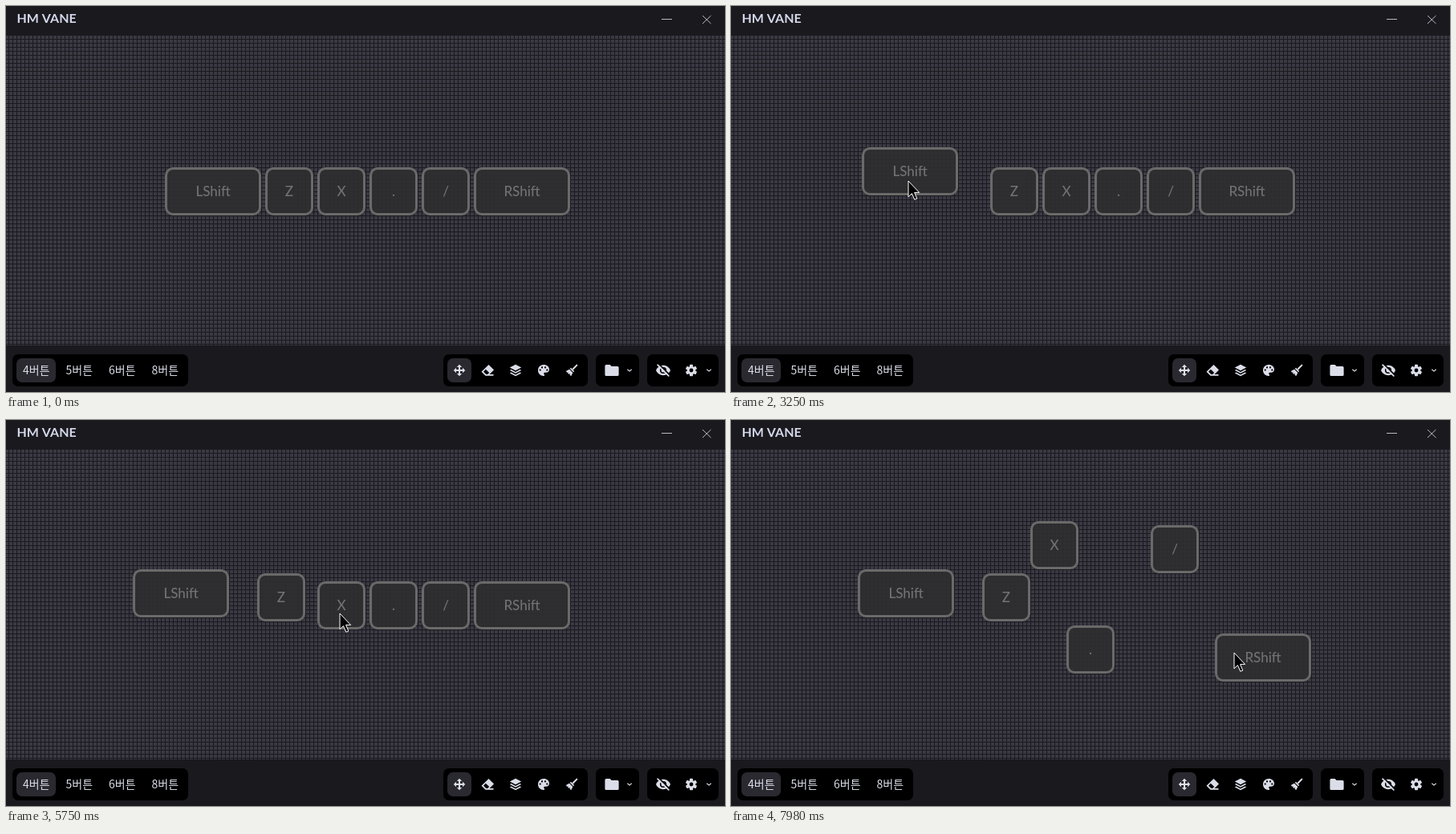
Animation, 896 px wide and 481 px high, one loop 8 s. Source, as an HTML page with a canvas:

```html
<!DOCTYPE html>
<html lang="ko">
<head>
<meta charset="utf-8">
<title>Key layout</title>
<style>
  html, body { margin: 0; width: 100%; height: 100%; overflow: hidden; background: #1a191e; }
  canvas { display: block; width: 896px; height: 481px; }
</style>
</head>
<body>
<canvas id="stage" width="896" height="481"></canvas>
<script>
const W = 896, H = 481, LOOP = 8000, STEP = 5;
const BAR = '#1a191e', PANEL = '#000', ACTIVE = '#2a2930', FG = '#dbdee8';
const UI_FONT = '14px "Noto Sans CJK KR", "Noto Sans CJK", "Noto Sans CJK JP", sans-serif';
const TITLE_FONT = '700 16px Lato, "Open Sans", sans-serif';
const KEY_FONT = '500 17px Lato, "Open Sans", sans-serif';
const ctx = document.getElementById('stage').getContext('2d');

// Quarter points of a clockwise ellipse, starting at its bottom.
const orbit = (cx, cy, rx, ry, count) => Array.from({ length: count }, (_, i) => {
  const a = (i + 1) * Math.PI / 2;
  return [cx + rx * Math.cos(a), cy + ry * Math.sin(a)];
});

// Each key is grabbed at a point and dragged through offsets; the last is the drop.
const keys = [
  { label: 'LShift', w: 120, from: 2010, to: 3410, grab: [256, 240], via: [...orbit(-31, 2, 51, 38, 7), [-40, -15]] },
  { label: 'Z', w: 60, from: 4122, to: 5100, grab: [343, 237], via: [[18, 68], [20, 27], [-19, -39], [-39, -22], [-10, -10]] },
  { label: 'X', w: 60, from: 5740, to: 6200, grab: [415, 240], via: [[5, 8], [-15, -75]] },
  { label: '.', w: 60, from: 6530, to: 6850, grab: [457, 223], via: [[10, 30], [-22, 59], [-35, 55]] },
  { label: '/', w: 60, from: 7110, to: 7400, grab: [535, 230], via: [[5, -70]] },
  { label: 'RShift', w: 120, from: 7790, to: LOOP, grab: [606, 224], via: [[20, 65]] }
];

// The pointer enters, rests, then alternates between drags and glides.
const legs = [
  { from: 800, to: 1330, pts: [[890, 338], [278, 240]] },
  { from: 1470, to: 1820, pts: [[278, 240], keys[0].grab] }
];
let left = 198;
keys.forEach((k, i) => {
  k.x = left;
  left += k.w + STEP;
  const pts = [[0, 0], ...k.via].map(([x, y]) => [k.grab[0] + x, k.grab[1] + y]);
  legs.push({ from: k.from, to: k.to, pts });
  const next = keys[i + 1];
  if (!next) return;
  const gap = next.from - k.to;
  legs.push({ from: k.to + gap * 0.25, to: k.to + gap * 0.78, pts: [pts.at(-1), next.grab] });
});

// Spline tangent, flat at ends and turning points.
function slope(pts, i, c) {
  const a = pts[i - 1], b = pts[i], d = pts[i + 1];
  if (!a || !d || (b[c] - a[c]) * (d[c] - b[c]) <= 0) return 0;
  return (d[c] - a[c]) / 2;
}

function pointer(t) {
  const { from, to, pts } = legs.findLast(l => t >= l.from) || legs[0];
  const u = Math.min(1, Math.max(0, (t - from) / (to - from)));
  const s = (1 - (1 - u) ** 1.34) * (pts.length - 1);
  const i = Math.min(Math.floor(s), pts.length - 2);
  const v = s - i, v2 = v * v, v3 = v2 * v, e = 3 * v2 - 2 * v3;
  const at = c => pts[i][c] + (pts[i + 1][c] - pts[i][c]) * e +
    (v3 - 2 * v2 + v) * slope(pts, i, c) + (v3 - v2) * slope(pts, i + 1, c);
  return [at(0), at(1)];
}

function keyPos(k, t) {
  if (t < k.from) return [k.x, 201];
  const p = pointer(Math.min(t, k.to));
  return [k.x, 201].map((v, c) => v + Math.round((p[c] - k.grab[c]) / STEP) * STEP);
}

function box(g, x, y, w, h, r, fill) {
  g.beginPath();
  g.roundRect(x, y, w, h, r);
  g.fillStyle = fill;
  g.fill();
}

function dot(g, x, y, r, fill) {
  g.beginPath();
  g.arc(x, y, r, 0, 7);
  g.fillStyle = fill;
  g.fill();
}

// Runs a drawing with its origin at the icon's centre.
function at(g, x, y, paint) {
  g.save();
  g.translate(x, y);
  paint(g);
  g.restore();
}

const solid = d => g => {
  g.fillStyle = FG;
  g.fill(new Path2D(d), 'evenodd');
};

const line = (d, w) => g => {
  g.strokeStyle = FG;
  g.lineWidth = w;
  g.lineCap = g.lineJoin = 'round';
  g.stroke(new Path2D(d));
};

function move(g) {
  for (let i = 0; i < 4; i++) {
    solid('M0-7.2L3.2-4H1V0H-1V-4H-3.2Z')(g);
    g.rotate(Math.PI / 2);
  }
}

const eraser = solid('M1.5-7L8-.5L2.5 5H7.5V6.7H-2.5L-7.5 1.7ZM-2.2-1.2L-5 1.7L-1.7 5H0L2.2 2.9Z');

function layers(g) {
  solid('M0-7.2L7.2-3.5L0 .2L-7.2-3.5Z')(g);
  for (const y of [0, 3.5]) at(g, 0, y, solid('M-7.2 0L-5.5-.9L0 1.9L5.5-.9L7.2 0L0 3.7Z'));
}

function palette(g) {
  solid('M0-7C4-7 7-4.4 7-1C7 1.4 5.2 2.8 3 2.8H1.6C.2 2.8-.2 4 .6 4.9C1.5 6 1 7 0 7C-4 7-7 4-7 0S-4-7 0-7Z')(g);
  for (const side of [-1, 1]) {
    dot(g, side * 4.3, -0.4, 1.15, PANEL);
    dot(g, side * 2, -3.6, 1.15, PANEL);
  }
}

function broom(g) {
  line('M6.3-6.4L1.8-1.8', 2)(g);
  solid('M-1-3.2L3.2 1L2 2.2L-2.2-2ZM-3-1.3L1.3 3L-.8 7.2L-2.5 5.6L-2 4L-3.8 4.8L-5 3.6L-4 2.4L-5.9 2.7L-7.2 1Z')(g);
}

const folder = solid('M-8.6-5.4Q-8.6-7-7-7H-2.4L-.4-5H7Q8.6-5 8.6-3.4V5.4Q8.6 7 7 7H-7Q-8.6 7-8.6 5.4Z');
const chevron = line('M-2.4-1L0 1.1L2.4-1', 1.1);

function hiddenEye(g) {
  solid('M-9 0C-5.5-8.2 5.5-8.2 9 0C5.5 8.2-5.5 8.2-9 0Z')(g);
  dot(g, 0, 0, 4.1, PANEL);
  dot(g, 0, 0, 2.5, FG);
  g.rotate(Math.PI / 4);
  box(g, -11, -2.6, 22, 1.8, 0, PANEL);
  box(g, -10.5, -0.8, 21, 1.7, 0.6, FG);
}

function gear(g) {
  dot(g, 0, 0, 5.3, FG);
  for (let i = 0; i < 6; i++) {
    box(g, -2, -7.2, 4, 4, 0.8, FG);
    g.rotate(Math.PI / 3);
  }
  dot(g, 0, 0, 2.4, PANEL);
}

function drawToolbar(g) {
  for (const [x, w] of [[8, 219], [545, 180], [735, 54], [799, 89]]) box(g, x, 434, w, 40, 7, PANEL);
  box(g, 13, 439, 49, 30, 7, ACTIVE);
  box(g, 550, 439, 30, 30, 7, ACTIVE);

  g.fillStyle = FG;
  g.font = UI_FONT;
  [4, 5, 6, 8].forEach((n, i) => g.fillText(n + '버튼', 21 + i * 53.5, 459));

  [move, eraser, layers, palette, broom].forEach((paint, i) => at(g, 565 + i * 35, 454, paint));
  at(g, 755, 454, folder);
  at(g, 819, 454, hiddenEye);
  at(g, 854, 454, gear);
  for (const x of [777, 876]) at(g, x, 454, chevron);
}

function makeBackdrop() {
  const c = document.createElement('canvas');
  c.width = W;
  c.height = H;
  const g = c.getContext('2d');
  g.fillStyle = '#3a3943';
  g.fillRect(0, 0, W, H);
  g.fillStyle = BAR;
  for (let x = 3; x < W; x += STEP) g.fillRect(x, 0, 1, H);
  for (let y = 1; y < H; y += STEP) g.fillRect(0, y, W, 1);
  g.fillRect(0, 0, W, 37);
  g.fillRect(0, 423, W, H - 423);

  g.fillStyle = '#d3d8ea';
  g.font = TITLE_FONT;
  g.fillText('HM VANE', 13.5, 21);
  g.strokeStyle = '#b9bac0';
  g.stroke(new Path2D('M817 16.5H830M868 12L878.5 22M878.5 12L868 22'));
  drawToolbar(g);
  return c;
}

function drawKey(k, x, y) {
  box(ctx, x, y, k.w, 60, 10, 'rgba(46,46,47,.9)');
  ctx.beginPath();
  ctx.roundRect(x + 1.5, y + 1.5, k.w - 3, 57, 8.5);
  ctx.strokeStyle = 'rgba(113,113,113,.9)';
  ctx.lineWidth = 3;
  ctx.stroke();
  ctx.font = KEY_FONT;
  ctx.textAlign = 'center';
  ctx.fillStyle = 'rgba(121,121,121,.9)';
  ctx.fillText(k.label, x + k.w / 2, y + 36);
}

const arrowShape = new Path2D('M1 1V20.8L5.4 16.6L8.8 24.3L11.8 23L8.6 15.4H14.6Z');
const fingers = new Path2D('M-3.6-.5L-4.6-5M-1-1L-1.3-7M1.7-1L2.2-6.6M4.3 0L5.5-4.3M-3.2 4L-6.6 .6');
const palm = new Path2D('M-4.4-1.5L5-1.5L5.6 1Q5.4 4 3.6 6V7.4H-2.4V6.2L-5 2.8Z');
const creases = new Path2D('M-2.4-1.2V-4.5M.4-1.4V-5M3-1.2L3.5-4.2');

function arrow(g) {
  g.lineJoin = 'round';
  g.fillStyle = '#000';
  g.fill(arrowShape);
  g.strokeStyle = '#fff';
  g.lineWidth = 1;
  g.stroke(arrowShape);
}

function hand(g) {
  g.lineCap = g.lineJoin = 'round';
  for (const [color, width, edge] of [['#000', 4, 2], ['#fff', 2.3, 0.4]]) {
    g.strokeStyle = g.fillStyle = color;
    g.lineWidth = width;
    g.stroke(fingers);
    g.lineWidth = edge;
    g.stroke(palm);
    g.fill(palm);
  }
  g.strokeStyle = '#333';
  g.lineWidth = 0.6;
  g.stroke(creases);
}

const backdrop = makeBackdrop();

function draw(t) {
  ctx.drawImage(backdrop, 0, 0);
  const [px, py] = pointer(t);
  let held = false, over = false;
  for (const k of keys) {
    const [x, y] = keyPos(k, t);
    drawKey(k, x, y);
    held ||= t >= k.from && t < k.to;
    over ||= px >= x && px < x + k.w && py >= y && py < y + 60;
  }
  if (t >= legs[0].from) at(ctx, Math.round(px), Math.round(py), over && !held ? hand : arrow);
}

const start = performance.now();
function tick() {
  draw((performance.now() - start) % LOOP);
  requestAnimationFrame(tick);
}
tick();
</script>
</body>
</html>
```
